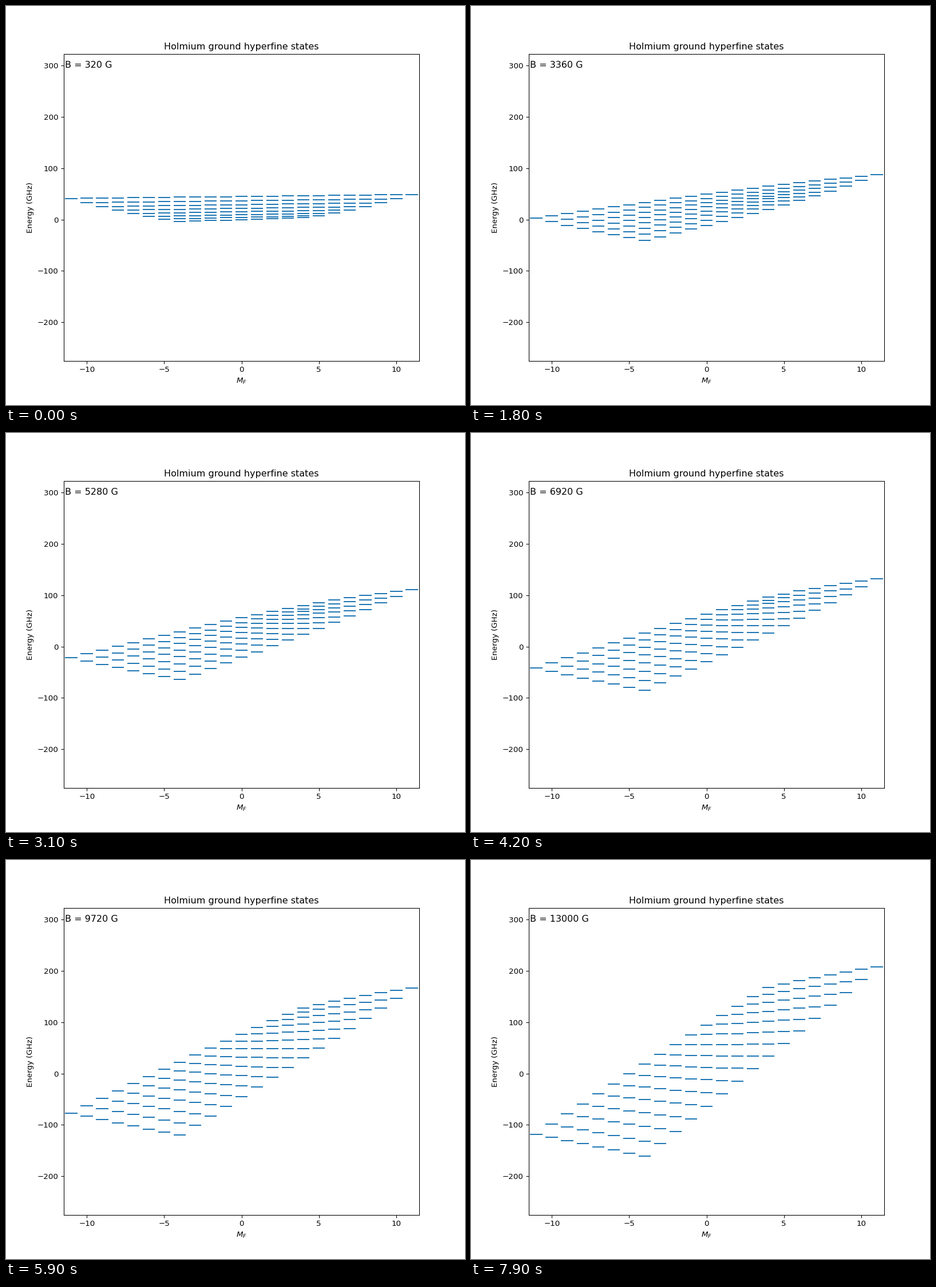
A matplotlib script for the animation above (8000 ms loop, 802x698 px).

```python
import numpy as np
import matplotlib.pyplot as plt
from matplotlib.animation import FuncAnimation
from matplotlib.collections import LineCollection

FRAMES, INTERVAL = 80, 100
DPI = 96

# Atomic constants (GHz, GHz/G)
J, I = 7.5, 3.5
A_HFS, B_HFS = 0.800583, -1.668
ZEEMAN = 1.1951 * 1.399624e-3
B_MAX = 20000


def spin(j):
    """Return the Jz and J+ matrices of a spin j."""
    m = np.arange(j, -j - 1, -1)
    raising = np.diag(np.sqrt(j * (j + 1) - m[1:] * (m[1:] + 1)), 1)
    return np.diag(m), raising


def hamiltonian():
    """Return the field-free part, the Zeeman diagonal and M_F per state."""
    jz, jp = spin(J)
    iz, ip = spin(I)
    dot = np.kron(jz, iz) + 0.5 * (np.kron(jp, ip.T) + np.kron(jp.T, ip))
    one = np.eye(len(dot))
    quad = 3 * dot @ dot + 1.5 * dot - I * (I + 1) * J * (J + 1) * one
    quad /= 2 * I * (2 * I - 1) * J * (2 * J - 1)
    h0 = A_HFS * dot + B_HFS * quad
    h0 -= np.linalg.eigvalsh(h0)[0] * one
    mj = np.repeat(np.diag(jz), len(iz))
    mi = np.tile(np.diag(iz), len(jz))
    return h0, ZEEMAN * mj, np.rint(mj + mi).astype(int)


H0, HZ, MF = hamiltonian()
BLOCKS = []
for m in range(-11, 12):
    idx = np.flatnonzero(MF == m)
    BLOCKS.append((m, H0[np.ix_(idx, idx)], HZ[idx]))


def levels(field):
    """List (M_F, energy) for every state at a field in gauss."""
    return [(m, e) for m, h0, hz in BLOCKS
            for e in np.linalg.eigvalsh(h0 + field * np.diag(hz))]


def field_at(i):
    """Field in 40 G steps; the sweep rate changes slightly on the way."""
    b = np.interp(i, [0, 18, 45, 72, 79], [320, 3350, 7375, 11905, 13000])
    return 40 * int(round(b / 40))


fig, ax = plt.subplots(figsize=(802 / DPI, 698 / DPI), dpi=DPI)
fig.subplots_adjust(left=0.1256, right=0.9006, bottom=0.1103, top=0.8803)
top_energies = [e for _, e in levels(B_MAX)]
low, high = min(top_energies), max(top_energies)
pad = 0.05 * (high - low)
ax.set_xlim(-11.5, 11.5)
ax.set_ylim(low - pad, high + pad)
ax.set_title("Holmium ground hyperfine states")
ax.set_xlabel("$M_F$")
ax.set_ylabel("Energy (GHz)")

dashes = LineCollection([], colors="#1f77b4", linewidths=1.5)
ax.add_collection(dashes, autolim=False)
label = ax.text(-11.4, high, "", fontsize=12)


def update(i):
    field = field_at(i)
    dashes.set_segments([[(m - 0.4, e), (m + 0.4, e)]
                         for m, e in levels(field)])
    label.set_text(f"B = {field} G")
    return dashes, label


anim = FuncAnimation(fig, update, frames=FRAMES, interval=INTERVAL,
                     repeat=True, repeat_delay=0)
plt.show()
```
